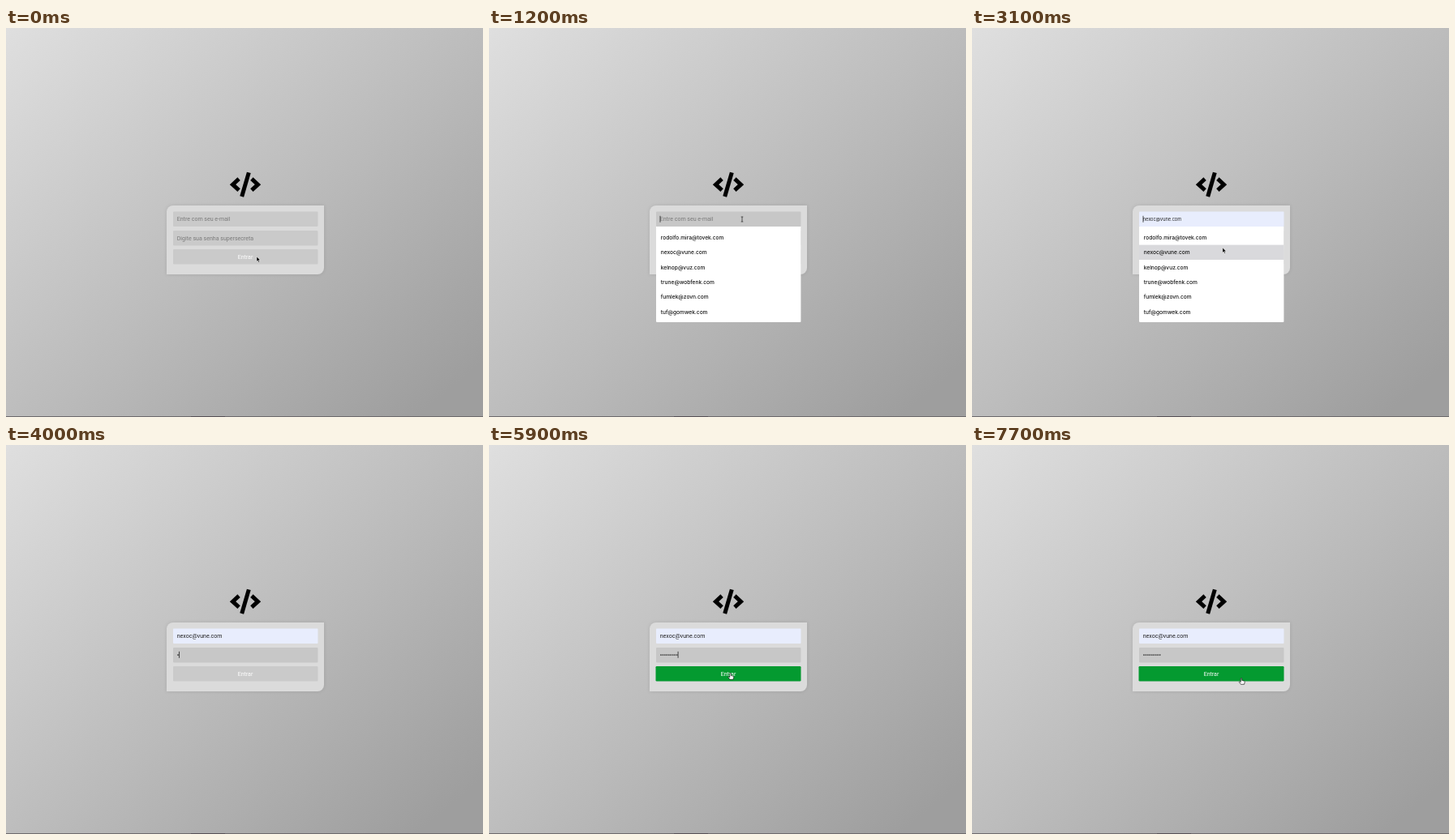
An HTML page for the animation above (8000 ms loop, 588 by 480 pixels).

```html
<!DOCTYPE html>
<html lang="pt-BR">
<head>
<meta charset="utf-8">
<title>Login</title>
<style>
  html, body { margin: 0; width: 100%; height: 100%; overflow: hidden; }
  body { background: linear-gradient(140deg, #dfdfdf, #bababa 54%, #9e9e9e 93%); }
  svg { display: block; width: 588px; height: 480px; }
  text { font: 7.05px Roboto, sans-serif; fill: #222; }
  .hint { fill: #7b7b7b; }
  .menu text { font: 500 6.6px Inter, sans-serif; fill: #151515; }
  #email.preview { font: 5.6px Inter, sans-serif; }
  .field { fill: #cacaca; }
  .field.focus { fill: #c7c7c7; }
  .field.filled { fill: #e8edfd; }
  .icon { fill: none; stroke: #000; stroke-width: 5; }
  .card { fill: #dbdbdb; filter: drop-shadow(0 0 2px rgba(0, 0, 0, .1)); }
  .menu > .sheet { fill: #fff; filter: drop-shadow(0 .5px .6px rgba(0, 0, 0, .15)); }
</style>
</head>
<body>
<svg viewBox="0 0 588 480">
  <rect y="479" width="588" height="1" fill="#6c696b"/>
  <rect x="228" y="479" width="42" height="1" fill="#554f54"/>

  <g class="icon">
    <path id="chevron" d="M287.1 186.2L279.5 193.2L287.1 200.2"/>
    <use href="#chevron" transform="matrix(-1 0 0 1 590 0)"/>
    <path d="M299.3 178.4L290.7 208"/>
  </g>

  <path class="card" d="M206 219H392V296a8 8 0 0 1-8 8H198V227a8 8 0 0 1 8-8Z"/>

  <rect id="emailBox" class="field" x="206" y="226.5" width="178.5" height="18.5" rx="1"/>
  <text id="email" x="210.7" y="238.3"></text>

  <rect id="passBox" class="field" x="206" y="250" width="178.5" height="18.5" rx="1"/>
  <text id="passHint" class="hint" x="210.7" y="261.6">Digite sua senha supersecreta</text>
  <g id="dots" fill="#222"></g>

  <rect class="field" x="206" y="273" width="178.5" height="18.5" rx="1"/>
  <rect id="green" x="205.5" y="273" width="179" height="18.5" rx="1.2" fill="#049a30"/>
  <text x="295" y="284.8" text-anchor="middle" style="fill:#fff">Entrar</text>

  <g id="menu" class="menu">
    <path class="sheet" d="M206 245H384.5V362a1 1 0 0 1-1 1H207a1 1 0 0 1-1-1Z"/>
    <rect id="hover" x="206" width="178.5" height="18.4" fill="#d9d9dc"/>
  </g>

  <rect id="caret" width=".8" height="8" fill="#222"/>

  <g id="cursor">
    <path id="arrow" d="M0 0V6.2L1.4 5L2.4 7.2L3.5 6.7L2.5 4.6H4.5Z" fill="#000" stroke="#fff" stroke-width=".5"/>
    <path id="beam" d="M-1.3-3H1.3M0-3V3M-1.3 3H1.3" fill="none" stroke="#222" stroke-width=".7"/>
    <path id="hand" d="M-.7.4Q0-.6.7.4V3L3.6 3.7Q4.4 4 4.2 5L3.6 7.8H-.6L-2.6 5.2Q-2.6 4.2-1.6 4.5L-.7 5.2Z" fill="#fff" stroke="#111" stroke-width=".65"/>
  </g>
</svg>

<script>
const LOOP = 8000, STEP = 100;
const ROW = 18.4, MENU_TOP = 249.2;
const DOTS = 9, DOT_GAP = 2.45;
const OPEN = 1100, PICK = 3400, PASS = 3700, TYPE = 4000, TYPED = 4900, BLINK = 567;
const NS = 'http://www.w3.org/2000/svg';

const mails = ['rodolfo.mira@tovek.com', 'nexoc@vune.com', 'kelnop@vuz.com',
               'trune@wobfenk.com', 'fumlek@zovn.com', 'tuf@gomwek.com'];

// Eased pointer moves
const home = { x: 309, y: 282 };
const moves = [
  { from: 100, to: 700, x: 312, y: 236 },
  { from: 1600, to: 2200, x: 307, y: 255 },
  { from: 2500, to: 3200, x: 309, y: 272 },
  { from: PICK, to: 3600, x: 309, y: 259 },
  { from: 5100, to: 5900, x: 297.5, y: 281.5 },
  { from: 6100, to: 7700, x: 332, y: 287.5 }
];

const $ = id => document.getElementById(id);
const show = (el, on) => el.setAttribute('visibility', on ? 'visible' : 'hidden');
const ramp = (t, a, b) => Math.min(1, Math.max(0, (t - a) / (b - a)));
const smooth = k => k * k * (3 - 2 * k);

function add(parent, tag, attrs, label = '') {
  const el = document.createElementNS(NS, tag);
  for (const k in attrs) el.setAttribute(k, attrs[k]);
  el.textContent = label;
  parent.append(el);
  return el;
}
mails.forEach((m, i) => add($('menu'), 'text', { x: 211.8, y: 260.7 + i * ROW }, m));
const dots = Array.from({ length: DOTS }, (_, i) =>
  add($('dots'), 'circle', { cx: 212 + i * DOT_GAP, cy: 259, r: .85 }));

function pointerAt(t) {
  let { x, y } = home;
  for (const m of moves) {
    const k = smooth(ramp(t, m.from, m.to));
    x += (m.x - x) * k;
    y += (m.y - y) * k;
  }
  return { x, y };
}

function caretOn(t) {
  if (t < OPEN - STEP || t >= PICK && t < PASS) return false;
  return t < TYPED || Math.floor((t - TYPED) / BLINK + .25) % 2 === 0;
}

function draw(t) {
  const { x, y } = pointerAt(t);
  const open = t >= OPEN && t < PICK;
  const row = open && y >= MENU_TOP ? Math.floor((y - MENU_TOP) / ROW) : -1;
  const chosen = t >= PICK;
  const inPass = t >= PASS;
  const count = t < TYPE ? 0 : 1 + Math.floor((DOTS - 1) * ramp(t, TYPE, TYPED));
  const ready = ramp(t, 4500, 4700);

  const filled = chosen || row >= 0;
  $('email').textContent = chosen ? mails[1] : row >= 0 ? mails[row] : 'Entre com seu e-mail';
  $('email').setAttribute('class', chosen ? '' : filled ? 'preview' : 'hint');
  $('emailBox').setAttribute('class', 'field ' + (filled ? 'filled' : t >= OPEN - STEP ? 'focus' : ''));
  $('passBox').setAttribute('class', 'field ' + (inPass ? 'focus' : ''));

  show($('passHint'), !count);
  dots.forEach((d, i) => show(d, i < count));
  $('green').setAttribute('opacity', ready);

  $('menu').setAttribute('display', open ? 'inline' : 'none');
  show($('hover'), row >= 0);
  $('hover').setAttribute('y', MENU_TOP + Math.max(row, 0) * ROW);

  show($('caret'), caretOn(t));
  $('caret').setAttribute('x', 210.6 + count * DOT_GAP);
  $('caret').setAttribute('y', inPass ? 254.8 : 231.8);

  const hidden = t >= TYPE && t < 5100;
  const inField = y > 226.5 && y < 245 || !open && y > 250 && y < 268.5;
  const kind = inField ? 'beam' : ready && y >= 273 ? 'hand' : 'arrow';
  for (const k of ['arrow', 'beam', 'hand']) show($(k), !hidden && k === kind);
  $('cursor').setAttribute('transform', `translate(${x} ${y})`);
}

const start = performance.now();
function tick() {
  const t = (performance.now() - start) % LOOP;
  draw(Math.floor(t / STEP) * STEP);
  requestAnimationFrame(tick);
}
tick();
</script>
</body>
</html>
```
